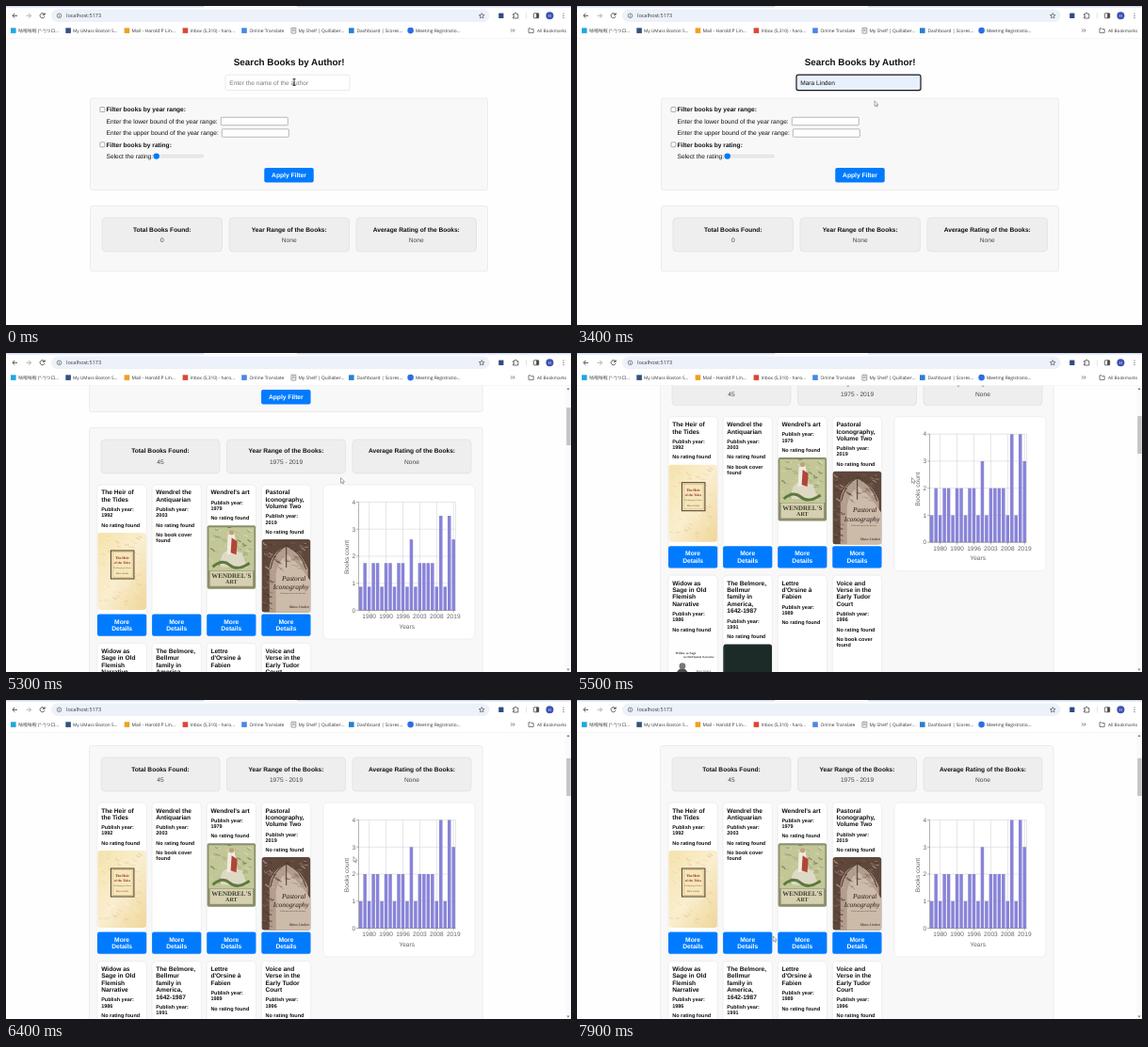
These frames come from a looping animation (600x339 px, 8 s). An HTML page:

```html
<!DOCTYPE html>
<html lang="en">
<head>
<meta charset="utf-8">
<title>Book search</title>
<style>
  html, body { margin: 0; width: 100%; height: 100%; overflow: hidden; background: #fff; }
  svg { display: block; width: 100%; height: 100%; }
  text { font-family: "Liberation Sans", Arial, sans-serif; text-rendering: geometricPrecision; white-space: pre; }
  .ui { font-family: "Open Sans", "Noto Sans CJK SC", "Noto Sans CJK", sans-serif; }
  .serif { font-family: "Liberation Serif", "Times New Roman", serif; }
</style>
</head>
<body>
<svg id="stage" viewBox="0 0 600 339"></svg>
<script>
const NS = 'http://www.w3.org/2000/svg';
const LOOP = 8000, STEP = 100;
const FILLED = 800, FOCUS = 300, LOADED = 4600;
const AUTHOR = 'Mara Linden';
const stage = document.getElementById('stage');

function el(parent, tag, attrs) {
  const node = document.createElementNS(NS, tag);
  for (const key in attrs) node.setAttribute(key, attrs[key]);
  return parent.appendChild(node);
}
const group = (parent, attrs = {}) => el(parent, 'g', attrs);
const rect = (g, x, y, width, height, fill, more) => el(g, 'rect', { x, y, width, height, fill, ...more });
const circle = (g, cx, cy, r, fill, more) => el(g, 'circle', { cx, cy, r, fill, ...more });
const path = (g, d, more) => el(g, 'path', { d, fill: 'none', ...more });
const edge = (stroke, rx = 2, w = 0.6) => ({ stroke, rx, 'stroke-width': w });

// y is the middle of the capitals
function text(g, x, y, str, size = 6.6, more = {}) {
  const node = el(g, 'text', { x, y: y + size * 0.35, 'font-size': size, fill: '#111', ...more });
  node.textContent = str;
  return node;
}
const bold = { 'font-weight': 700 };
const mid = { 'text-anchor': 'middle' };
const show = (node, on) => node.setAttribute('display', on ? 'inline' : 'none');

/* ---------- page ---------- */

rect(stage, 0, 0, 600, 339, '#fefefe');
const page = group(stage);

function blueButton(g, cx, y, w, h, lines) {
  rect(g, cx - w / 2, y, w, h, '#007bff', { rx: 2 });
  lines.forEach((line, i) =>
    text(g, cx, y + h / 2 + (i - (lines.length - 1) / 2) * 7.6, line, 6.7, { ...bold, ...mid, fill: '#fff' }));
}

function buildForm({ left, width, bottom, stats, statX, statW, statGap }) {
  const g = group(page);
  const cx = left + width / 2;
  const dx = left - 89.5;
  const box = edge('#e2e2e2');
  text(g, cx + 0.2, 59.3, 'Search Books by Author!', 9.85, { ...bold, ...mid });

  rect(g, left, 98, width, 97.5, '#f8f8f8', box);
  const at = group(g, { transform: `translate(${dx} 0)` });
  [['Filter books by year range:', 110], ['Filter books by rating:', 147.3]].forEach(([label, y]) => {
    rect(at, 99.9, y - 2.5, 5, 5, '#fff', edge('#767676', 0.8));
    text(at, 106.6, y, label, 6.6, bold);
  });
  text(at, 106.6, 122.4, 'Enter the lower bound of the year range:');
  rect(at, 228.3, 118.3, 71, 8.4, '#fff', edge('#8a8a8a', 0.8));
  text(at, 106.6, 135, 'Enter the upper bound of the year range:');
  rect(at, 229.3, 130.8, 71, 8.4, '#fff', edge('#8a8a8a', 0.8));
  text(at, 106.6, 159.6, 'Select the rating:');
  rect(at, 157, 158.4, 52.5, 2.4, '#efefef', edge('#b8b8b8', 1.2, 0.4));
  circle(at, 159.7, 159.6, 3.2, '#0078f8');
  blueButton(g, cx, 172, 52.5, 15.5, ['Apply Filter']);

  rect(g, left, 212.5, width, bottom - 212.5, '#f8f8f8', box);
  ['Total Books Found:', 'Year Range of the Books:', 'Average Rating of the Books:'].forEach((label, i) => {
    const x = statX + i * statGap;
    rect(g, x, 225, statW, 36, '#eeeeee', edge('#dcdcdc', 4));
    text(g, x + statW / 2, 237.2, label, 6.6, { ...bold, ...mid });
    text(g, x + statW / 2, 248.6, stats[i], 6.6, { ...mid, fill: '#444' });
  });

  const input = group(g);
  const x = cx - 67.5;
  const frame = rect(input, x, 73.2, 132, 16.4, '#fff', { rx: 2 });
  const value = text(input, x + 4.2, 81.5, '');
  const caret = rect(input, x + 5, 77.5, 0.6, 7.5, '#111');
  return { g, frame, value, caret, x };
}

const empty = buildForm({
  left: 89.5, width: 422, bottom: 282,
  stats: ['0', 'None', 'None'], statX: 102, statW: 127.5, statGap: 135
});
const found = buildForm({
  left: 88.6, width: 417.4, bottom: 2300,
  stats: ['45', '1975 - 2019', 'None'], statX: 101, statW: 126, statGap: 133.5
});

/* ---------- results ---------- */

const tiny = (g, x, y, str, size, fill, more) =>
  text(g, x, y, str, size, { ...mid, fill, class: 'serif', ...more });

let seed = 7;
const random = () => (seed = (seed * 16807) % 2147483647) / 2147483647;

// Scatters soft strokes over an area to give a printed texture
function mottle(g, x, y, w, h, colors, count) {
  for (let i = 0; i < count; i++) {
    const px = x + random() * (w - 5), py = y + random() * (h - 4);
    path(g, `M${px} ${py}q${random() * 3} ${random() * 4} 4 ${random() * 3}`,
      { stroke: colors[i % colors.length], 'stroke-width': 0.5 + random(), opacity: 0.55 });
  }
}

// Covers are drawn from their own top-left corner, 51.5 wide
const covers = {
  cream(g) {
    rect(g, 0, 0, 51.5, 82, 'url(#cream)', { rx: 3 });
    mottle(g, 1, 1, 49, 80, ['#ecd08c', '#fff6dc', '#eebf8a', '#e6cf9c'], 70);
    rect(g, 14, 19, 24.5, 30, '#f6e6ba', edge('#4a3a24', 0, 1));
    rect(g, 15.8, 20.8, 20.9, 26.4, 'none', edge('#b79a62', 0, 0.4));
    tiny(g, 26, 27, 'The Heir', 3.9, '#8a2b1c', bold);
    tiny(g, 26, 32, 'of the Tides', 3.5, '#8a2b1c', bold);
    tiny(g, 26, 37.5, 'The Mapping of Shores', 2, '#5a4630');
    tiny(g, 26, 43, AUTHOR, 2.6, '#6a5030');
  },
  green(g) {
    rect(g, 0, 0, 51.5, 67.5, '#8b8f6c', { rx: 2 });
    rect(g, 1.8, 2, 48, 46, '#c3c798');
    mottle(g, 2, 2, 47, 45, ['#6d8450', '#e6e2c2', '#93a76a', '#4f6339'], 60);
    path(g, 'M14 44Q13 28 24 26L37 29L43 45Z', { fill: '#ded9c4' });
    path(g, 'M22 10L29 8L32 29L21 31Z', { fill: '#f0ece0' });
    path(g, 'M26 13L32 17L31 31L25 29Z', { fill: '#b04638' });
    circle(g, 26, 7.5, 2.6, '#bfa27c');
    path(g, 'M6 44Q16 35 24 42T45 40', { stroke: '#5c7a40', 'stroke-width': 3 });
    rect(g, 3, 48.5, 45.5, 16, '#d6d0b0');
    tiny(g, 25.7, 53.5, "WENDREL'S", 7, '#3f4230', bold);
    tiny(g, 25.7, 60, 'ART', 6, '#3f4230', bold);
  },
  brown(g) {
    rect(g, 0, 0, 51.5, 77.5, '#5e463b', { rx: 2.5 });
    path(g, 'M8 77.5V30Q10 14 26 7Q43 14 49 32V77.5Z', { fill: '#b39d8c' });
    path(g, 'M15 77.5V36Q18 22 27 16Q38 24 51.5 44V77.5Z', { fill: '#cdbbaa' });
    mottle(g, 1, 2, 50, 34, ['#45312a', '#d2c2b2', '#7b6355', '#93806f'], 60);
    mottle(g, 0, 36, 14, 40, ['#3c2a24', '#8c7566'], 16);
    path(g, 'M9 32Q12 14 26 7Q42 14 47 32M26 7V30', { stroke: '#4b372f', 'stroke-width': 1 });
    const slant = { 'font-style': 'italic' };
    tiny(g, 34, 41, 'Pastoral', 7.4, '#2a1813', slant);
    tiny(g, 31, 50.5, 'Iconography', 7.4, '#2a1813', slant);
    tiny(g, 33, 57.5, 'Fields and ruins of the old shore', 2.1, '#4a352c');
    tiny(g, 39.5, 71.5, AUTHOR, 4, '#2a1813', slant);
  },
  white(g) {
    rect(g, 0, 0, 51.5, 82, '#fefefe', { rx: 3 });
    tiny(g, 18, 13, 'Widow as Sage', 3.4, '#333', bold);
    tiny(g, 32, 17, 'in Old Flemish Narrative', 3, '#333', bold);
    tiny(g, 37, 32, AUTHOR, 3, '#444');
    path(g, 'M7 45Q6 31 14 29Q22 30 23 46L19 50V66H16.5L15 52L13 66H10.5L11 50Z', { fill: '#4c4c4c' });
    path(g, 'M10 35L14 40L11 47M19 34L15.5 41L19 47M14 50V62', { stroke: '#a8a8a8', 'stroke-width': 1 });
    circle(g, 14.5, 27, 3.4, '#777');
  },
  dark(g) {
    rect(g, 0, 0, 51.5, 80, '#1c2b28', { rx: 2.5 });
    rect(g, 0, 3, 1, 75, '#31413c');
  }
};

const defs = el(stage, 'defs', {});
const grad = el(defs, 'linearGradient', { id: 'cream', x2: 1, y2: 1 });
['#f5e3ac', '#faeed0', '#efd699'].forEach((color, i) =>
  el(grad, 'stop', { offset: i / 2, 'stop-color': color }));

// title, year, cover, cover top; no cover name means the notice is shown
const books = [
  ['The Heir of|the Tides', 1992, 'cream', 324],
  ['Wendrel the|Antiquarian', 2003],
  ["Wendrel's art", 1979, 'green', 316.3],
  ['Pastoral|Iconography,|Volume Two', 2019, 'brown', 331],
  ['Widow as|Sage in Old|Flemish|Narrative', 1986, 'white', 511],
  ['The Belmore,|Bellmur|family in|America,|1642-1987', 1991, 'dark', 514.7],
  ["Lettre|d'Orsine à|Fabien", 1989, 'blank'],
  ['Voice and|Verse in the|Early Tudor|Court', 1996]
];

books.forEach(([title, year, cover, coverY], i) => {
  const x = 97 + (i % 4) * 58.1;
  const top = i < 4 ? 273 : 441.5;
  const height = i < 4 ? 161 : 179;
  const g = group(found.g);
  rect(g, x, top, 52.3, height, '#fff', edge('#e6e6e6', 4));
  const lines = title.split('|');
  lines.forEach((line, n) => text(g, x + 4.2, top + 8.2 + n * 7.4, line, 6.6, bold));
  const y = top + 8.2 + (lines.length - 1) * 7.4;
  const note = (dy, str) => text(g, x + 4.2, y + dy, str, 5.5, bold);
  note(10.6, 'Publish year:');
  note(16.8, year);
  note(27.2, 'No rating found');
  if (!cover) {
    note(37.6, 'No book cover');
    note(43.8, 'found');
  } else if (covers[cover]) {
    covers[cover](group(g, { transform: `translate(${x + 0.4} ${coverY})` }));
  }
  blueButton(g, x + 26.1, top + height - 23.5, 52.2, 23.2, ['More', 'Details']);
});

/* ---------- chart ---------- */

const counts = [...'12122122122131222214143'].map(Number);
const plot = { x: 374.5, y: 291.5, w: 103, h: 115 };
const base = plot.y + plot.h;
const band = plot.w / counts.length;
const unit = plot.h / 4;
const chart = group(found.g);
const gray = { fill: '#666' };
rect(chart, 337, 273, 161, 164, '#fff', edge('#e6e6e6', 5));

const line = (d, stroke) => path(chart, d, { stroke, 'stroke-width': 0.5 });
for (let n = 0; n <= 4; n++) {
  const y = base - n * unit;
  line(`M${plot.x} ${y}h${plot.w}`, '#ccc');
  line(`M${plot.x - 2.4} ${y}h2.4`, '#666');
  text(chart, plot.x - 3.4, y, n, 6.6, { ...gray, 'text-anchor': 'end' });
}
line(`M${plot.x + plot.w} ${plot.y}v${plot.h}`, '#ccc');
[1980, 1990, 1996, 2003, 2008, 2019].forEach((year, i) => {
  const x = plot.x + (2.5 + i * 4) * band;
  line(`M${x} ${plot.y}v${plot.h}`, '#ccc');
  line(`M${x} ${base}v2.4`, '#666');
  text(chart, x, 412.8, year, 6.6, { ...gray, ...mid });
});
const bars = counts.map((n, i) => rect(chart, plot.x + (i + 0.1) * band, base, 3.5, 0, '#8884d8'));
line(`M${plot.x} ${plot.y}v${plot.h}h${plot.w}`, '#666');
text(chart, 425.7, 423.3, 'Years', 6.6, { ...gray, ...mid });
text(chart, 0, 0, 'Books count', 6.6, { ...gray, ...mid, transform: 'translate(362 350) rotate(-90)' });

/* ---------- scrollbar ---------- */

const scrollbar = group(stage);
rect(scrollbar, 594, 34, 6, 305, '#fafafa');
path(scrollbar, 'M595.5 39L597 36.8L598.5 39ZM595.5 335.5L597 337.7L598.5 335.5Z', { fill: '#7d7d7d' });
const thumb = rect(scrollbar, 595.2, 41, 4.4, 45, '#c4c4c4');

/* ---------- browser bars ---------- */

const bar = group(stage);
const ink = { stroke: '#444', 'stroke-width': 0.9 };
const ui = (x, y, str, size, fill = '#333', more = {}) => text(bar, x, y, str, size, { fill, class: 'ui', ...more });
rect(bar, 0, 0, 600, 34.7, '#fff');
rect(bar, 0, 0, 600, 1.5, '#d3ddf3');
rect(bar, 210, 0, 99, 1.5, '#fff');
rect(bar, 0, 34.3, 600, 0.4, '#e9e9e9');
rect(bar, 48, 3.6, 465.5, 13.4, '#edf1f9', { rx: 6.7 });
path(bar, 'M12 10.3H7M9.3 7.9L6.9 10.3L9.3 12.7', ink);
path(bar, 'M21.5 10.3H26.5M24.2 7.9L26.6 10.3L24.2 12.7', { ...ink, stroke: '#aaa' });
path(bar, 'M40.8 9A2.5 2.5 0 1 0 41 11M41.2 7.3V9.4H39.1', ink);
circle(bar, 56.5, 10.3, 2.3, 'none', { ...ink, 'stroke-width': 0.6 });
path(bar, 'M56.5 9.9V11.6M56.5 8.8V9.3', { ...ink, 'stroke-width': 0.6 });
ui(64, 10.4, 'localhost:5173', 5.5);
path(bar, 'M505.2 7.5L506 9.5L508.1 9.6L506.4 10.9L507 13L505.2 11.8L503.4 13L504 10.9L502.3 9.6L504.4 9.5Z',
  { ...ink, 'stroke-width': 0.6 });
rect(bar, 523.2, 7.6, 5.2, 5.4, '#2e4a86');
path(bar, 'M538.5 8.6H540.2Q540.3 7 541.2 7T542.2 8.6H543.8V13H538.5V11.6Q540 11.5 540 10.8T538.5 10Z',
  { ...ink, 'stroke-width': 0.8 });
rect(bar, 552, 7, 0.6, 6.6, '#c9d6f2');
rect(bar, 560.3, 7.8, 5.4, 5, 'none', edge('#444', 0.6, 0.8));
rect(bar, 563.2, 7.8, 2.5, 5, '#444');
circle(bar, 577.4, 10.3, 4, '#3f51b5');
ui(577.4, 10.3, 'H', 4.2, '#fff', mid);
[8, 10.3, 12.6].forEach(y => circle(bar, 592, y, 0.6, '#444'));

// icon x, colour, label x, label, size
[
  [5, '#22a7e0', 13, '咕啦咕啦 (°-°)つロ...', 4.9],
  [63.3, '#35527e', 71, 'My UMass Boston S...', 4.75],
  [125.6, '#f0a020', 133.5, 'Mail - Harold P Lin...', 5],
  [187.6, '#dc4638', 195.5, 'Inbox (5,310) - haro...', 4.85],
  [250.2, '#4a86e8', 258.5, 'Online Translate', 4.85],
  [302.6, '', 310.5, 'My Shelf | Quillaber...', 4.85],
  [364, '#2a7fd0', 372.5, 'Dashboard | Scores...', 4.85],
  [0, '', 435, 'Meeting Registratio...', 4.85]
].forEach(([x, color, labelX, label, size]) => {
  if (color) rect(bar, x, 23.3, 5.6, 5.6, color);
  else if (x) {
    rect(bar, x + 0.4, 23.2, 4.8, 5.8, '#fff', edge('#555', 0.5));
    path(bar, `M${x + 1.4} 25h2.8m-2.8 1.4h2.8`, { ...ink, 'stroke-width': 0.5 });
  } else circle(bar, 429.6, 26.1, 3.3, '#2b6de5');
  ui(labelX, 26, label, size);
});
path(bar, 'M536.2 24.4L537.7 26L536.2 27.6M538.5 24.4L540 26L538.5 27.6', { ...ink, 'stroke-width': 0.7 });
path(bar, 'M555 23.8H557L557.8 24.6H560.2V28.4H555Z', { ...ink, 'stroke-width': 0.7 });
ui(564, 26, 'All Bookmarks', 4.7);

/* ---------- pointer ---------- */

const arrow = path(stage, 'M0 0V5.6L1.3 4.5L2.2 6.4L3.1 6L2.3 4.1H4Z',
  { fill: '#fff', stroke: '#555', 'stroke-width': 0.5 });
const beam = path(stage, 'M-1.5 -3.4H1.5M0 -3.4V3.4M-1.5 3.4H1.5', { stroke: '#111', 'stroke-width': 0.8 });

/* ---------- motion ---------- */

const ease = p => p * p * (3 - 2 * p);

// keys are rows of [time, ...values]
function sample(keys, t) {
  const next = keys.findIndex(k => k[0] > t);
  if (next < 0) return keys[keys.length - 1].slice(1);
  if (next === 0) return keys[0].slice(1);
  const a = keys[next - 1], b = keys[next];
  const p = ease((t - a[0]) / (b[0] - a[0]));
  return a.slice(1).map((v, i) => v + (b[i + 1] - v) * p);
}

const pointerKeys = [
  [0, 306, 81], [500, 306, 81], [1000, 316, 100.8], [3700, 316, 100.8], [4500, 355.5, 133.8],
  [5500, 355.5, 132.5], [5900, 352, 132], [6400, 369, 166.5], [6700, 369, 166.5], [7900, 208.3, 251]
];
const scrollKeys = [[0, 0], [5000, 0], [5500, 205.3], [5900, 277], [6000, 277], [6400, 164]];

function drawInput({ frame, value, caret, x }, t) {
  const focused = t >= FOCUS, filled = t >= FILLED;
  frame.setAttribute('fill', filled ? '#e8f0fe' : '#fff');
  frame.setAttribute('stroke', focused ? '#151515' : '#dcdcdc');
  frame.setAttribute('stroke-width', focused ? 1.2 : 0.6);
  value.textContent = filled ? AUTHOR : 'Enter the name of the author';
  value.setAttribute('fill', filled ? '#111' : '#7c7c7c');
  const start = filled ? FILLED : FOCUS;
  show(caret, focused && Math.floor((t - start) / 500) % 2 === 0);
  caret.setAttribute('x', x + 4.4 + (filled ? value.getComputedTextLength() : 0));
}

function draw(t) {
  const loaded = t >= LOADED;
  show(empty.g, !loaded);
  show(found.g, loaded);
  show(scrollbar, loaded);
  drawInput(loaded ? found : empty, t);

  const [scroll] = sample(scrollKeys, t);
  page.setAttribute('transform', `translate(0 ${-scroll})`);
  thumb.setAttribute('y', 41.4 + scroll * 0.125);
  thumb.setAttribute('height', scroll ? 40 : 45);

  const grow = ease(Math.min(1, Math.max(0, (t - LOADED) / 900)));
  bars.forEach((node, i) => {
    const h = counts[i] * unit * grow;
    node.setAttribute('y', base - h);
    node.setAttribute('height', h);
  });

  const [px, py] = sample(pointerKeys, t);
  const overInput = py < 90;
  show(beam, overInput);
  show(arrow, !overInput);
  (overInput ? beam : arrow).setAttribute('transform', `translate(${px} ${py})`);
}

const begin = performance.now();
function tick() {
  const t = (performance.now() - begin) % LOOP;
  draw(Math.floor(t / STEP) * STEP);
  requestAnimationFrame(tick);
}
tick();
</script>
</body>
</html>
```
